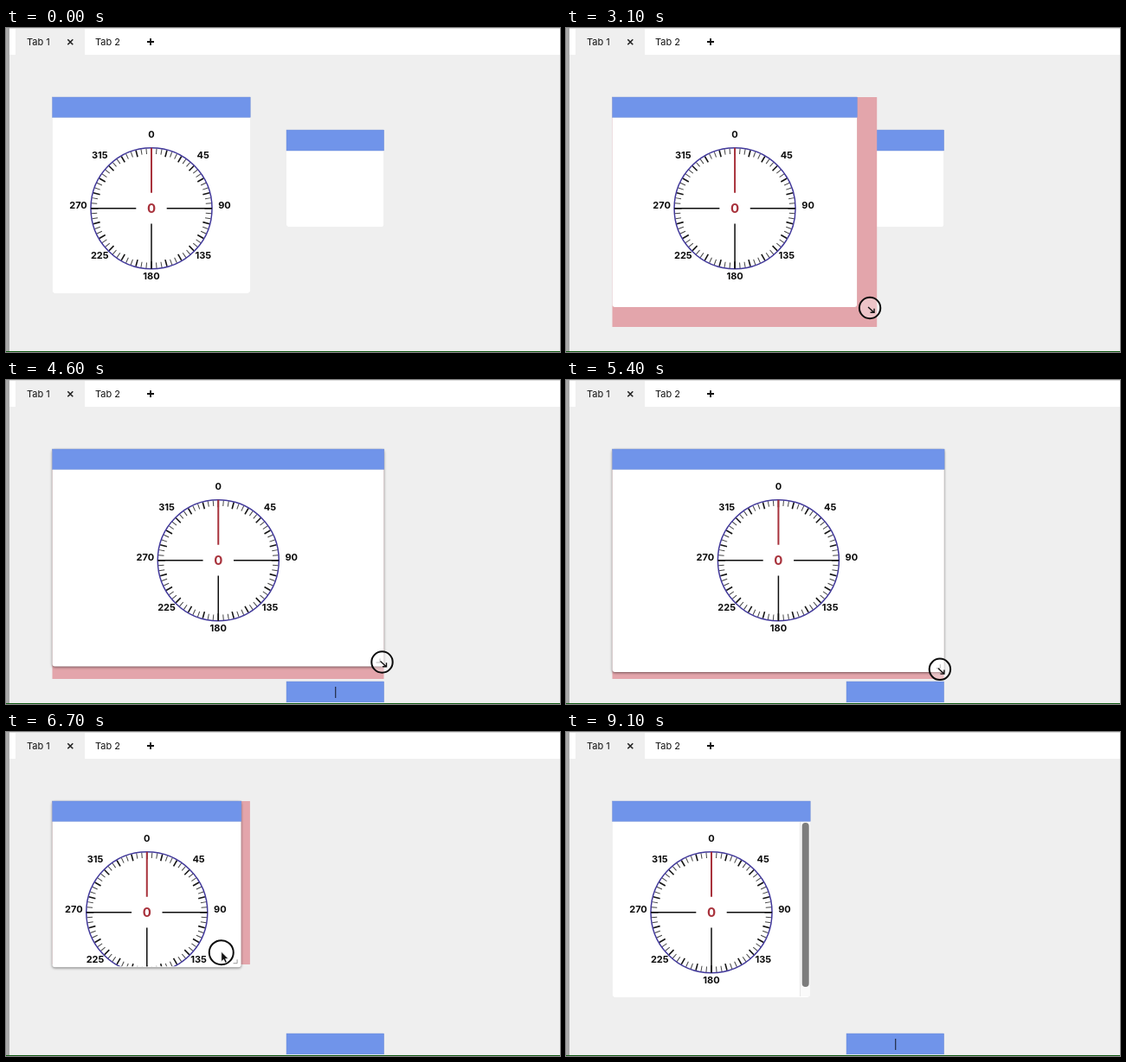
An HTML page that plays this animation: 640x375 px, repeating every 9.2 s.

```html
<!DOCTYPE html>
<html lang="en">
<head>
<meta charset="utf-8">
<title>Resizable widgets</title>
<style>
  html, body { margin: 0; width: 100%; height: 100%; overflow: hidden; background: #efefef; }
  svg { display: block; }
  text { font-family: Inter, "Open Sans", sans-serif; }
  .tab { font-size: 11px; font-weight: 400; fill: #111; }
  .label { font-size: 11px; font-weight: 700; text-anchor: middle; fill: #0b0b0b; }
  .value { font-size: 15px; font-weight: 700; text-anchor: middle; fill: #a8323c; }
  .head { fill: #7094ea; stroke: #6f8bd0; stroke-width: .4; }
  .lift { filter: drop-shadow(0 1px 1.5px rgba(0, 0, 0, .5)); }
  .rest { filter: drop-shadow(0 0 .5px rgba(0, 0, 0, .12)); }
</style>
</head>
<body>
<svg width="640" height="375" viewBox="0 0 640 375">
  <defs>
    <clipPath id="clip"><rect id="clipBox" x="53.5" y="80" rx="2"/></clipPath>
  </defs>
  <rect width="640" height="375" fill="#efefef"/>
  <rect x="4" y="1" width="636" height="30" fill="#fff"/>
  <rect x="11" y="1" width="80" height="30" fill="#efefef"/>
  <rect width="640" height="1" fill="#dedede"/>
  <text class="tab" x="24" y="20">Tab 1</text>
  <text class="tab" x="103" y="20">Tab 2</text>
  <path d="M71.3 13.3l6 6m0-6l-6 6" stroke="#222" stroke-width="1.6"/>
  <path d="M163 16h8m-4-4v8" stroke="#111" stroke-width="1.8"/>

  <g id="second">
    <rect class="rest" x="324" width="112.5" height="112" rx="2" fill="#fff"/>
    <rect class="head" x="324" width="112.7" height="24"/>
    <path id="caret" d="M380.7 6v13" stroke="#222b45" stroke-width="1.2"/>
  </g>

  <rect id="slot" x="53.5" y="80" fill="#e3a5ab"/>

  <g id="widget">
    <rect id="card" x="53.5" y="80" rx="3" fill="#fff"/>
    <g clip-path="url(#clip)">
      <g id="compass"></g>
      <g id="bar">
        <rect x="270.5" y="104" width="12" height="203" fill="#fafafa"/>
        <path d="M270.5 104v203" stroke="#e8e8e8"/>
        <rect x="272.7" y="105" width="8" height="190" rx="4" fill="#7d7d7d"/>
      </g>
    </g>
    <rect id="head" class="head" x="53.5" y="80" height="23.5"/>
    <path id="grip" d="M0-4.5V0H-4.5" fill="none" stroke="#999"/>
  </g>

  <g id="mouse">
    <circle id="ring" fill="#fff" fill-opacity=".35" stroke="#0c0c0c" stroke-width="2"/>
    <path id="arrow" d="M0-1V10.5L2.7 8.1L4.6 12L6.6 11.1L4.8 7.3H8.2Z" fill="#111" stroke="#fff" stroke-width=".7"/>
    <path id="resize" d="M-2-1L4.5 5M5 .8V5.3H.5" fill="none" stroke="#111" stroke-width="1.4"/>
  </g>

  <rect width="4" height="374" fill="#a9a9a9"/>
  <rect y="374" width="640" height="1" fill="#125c14"/>
</svg>
<script>
const LOOP = 9200, LEFT = 53.5, TOP = 80, HOME = [228.5, 227];
const CELL = [38.65, 38.5], GAP = 3.5, LAG = 120;
const GRAB = 2650, PUSH = 3150, TURN = 6100, DROP = 7400, SETTLE = 7600, RESET = 8500;

// time, x, y of the pointer
const PATH = [
  [400, 245, 395], [1800, 278, 303], [GRAB, 278, 303], [3650, 440, 349.5],
  [3800, 440, 349.5], [4480, 432, 327], [4600, 434.5, 326.5], [6000, 430, 341],
  [6300, 310, 297], [7380, 145, 184.5], [7500, 117, 178], [8700, 200, 395]
];

const $ = id => document.getElementById(id);
const mix = (a, b, k) => a + (b - a) * k;
const ramp = (t, from, length) => Math.min(1, Math.max(0, (t - from) / length));
const mixAll = (a, b, k) => a.map((v, i) => mix(v, b[i], k));

function pointer(t) {
  const i = Math.max(1, PATH.findIndex(p => p[0] > t));
  const last = PATH.length - 1;
  const n = t >= PATH[last][0] ? last : i;
  const [t0, ...a] = PATH[n - 1], [t1, ...b] = PATH[n];
  return mixAll(a, b, ramp(t, t0, t1 - t0));
}

// The corner trails the pointer, settles into its cells, then springs home.
function layout(t) {
  if (t < GRAB) return { size: HOME, slot: HOME };
  const [x, y] = pointer(Math.min(t, DROP + LAG) - LAG);
  const drag = [x + 4.5 - LEFT, y + 4.5 - TOP];
  const slot = drag.map((v, i) => {
    const cells = Math.max(3, Math.ceil((v + GAP) / CELL[i] - .25));
    return cells * CELL[i] - GAP;
  });
  const settled = mixAll(drag, slot, ramp(t, SETTLE, 200));
  return { size: mixAll(settled, HOME, ramp(t, RESET, 200)), slot };
}

function set(id, attrs) {
  for (const key in attrs) $(id).setAttribute(key, attrs[key]);
}

const show = (id, on) => set(id, { visibility: on ? "visible" : "hidden" });
const move = (id, x, y) => set(id, { transform: `translate(${x} ${y})` });

function buildCompass() {
  let out = "";
  const line = (deg, r1, r2, color, width) => {
    out += `<path d="M0 ${-r1}V${-r2}" transform="rotate(${deg})" stroke="${color}" stroke-width="${width}"/>`;
  };
  for (let d = 0; d < 360; d += 5) {
    const major = d % 15 === 0;
    line(d, 69.5, major ? 61.5 : 63, major ? "#151515" : "#444", major ? 1.6 : 1);
  }
  out += '<circle r="70" fill="none" stroke="#41389a" stroke-width="1.5"/>';
  for (const d of [90, 180, 270]) line(d, 70, 17.7, "#0c0c0c", 1.5);
  line(0, 70, 18, "#a8323c", 2);
  for (let d = 0; d < 360; d += 45) {
    const a = d * Math.PI / 180;
    out += `<text class="label" x="${84.5 * Math.sin(a)}" y="${.3 - 82 * Math.cos(a)}">${d}</text>`;
  }
  $("compass").innerHTML = out + '<text class="value" y="5.5">0</text>';
}

function draw(t) {
  const { size: [w, h], slot } = layout(t);
  const held = t >= GRAB && t < 8000;
  const hover = t >= 4000 && t < 8000;
  const corner = t >= 1800 && t < TURN;

  set("card", { width: w, height: h, class: hover ? "lift" : "rest" });
  set("clipBox", { width: w, height: h - 1 });
  set("head", { width: w + .3 });
  move("compass", LEFT + .25 + Math.max(w, 210) / 2, 208.7);
  move("grip", LEFT + w - 4.5, TOP + h - 4.5);
  show("grip", hover);
  show("bar", t >= RESET + 200);

  set("slot", { width: slot[0], height: slot[1] });
  show("slot", held);

  move("second", 0, mix(118, 349, ramp(t, PUSH, 300)));
  show("caret", (t + 425) % 595 < 298);

  move("mouse", ...pointer(t));
  set("ring", { r: corner ? 12.2 : 14 });
  show("ring", t >= 1900 && t < DROP);
  show("resize", corner);
  show("arrow", !corner);
}

buildCompass();
const start = performance.now();
function tick() {
  draw((performance.now() - start) % LOOP);
  requestAnimationFrame(tick);
}
draw(0);
requestAnimationFrame(tick);
</script>
</body>
</html>
```
